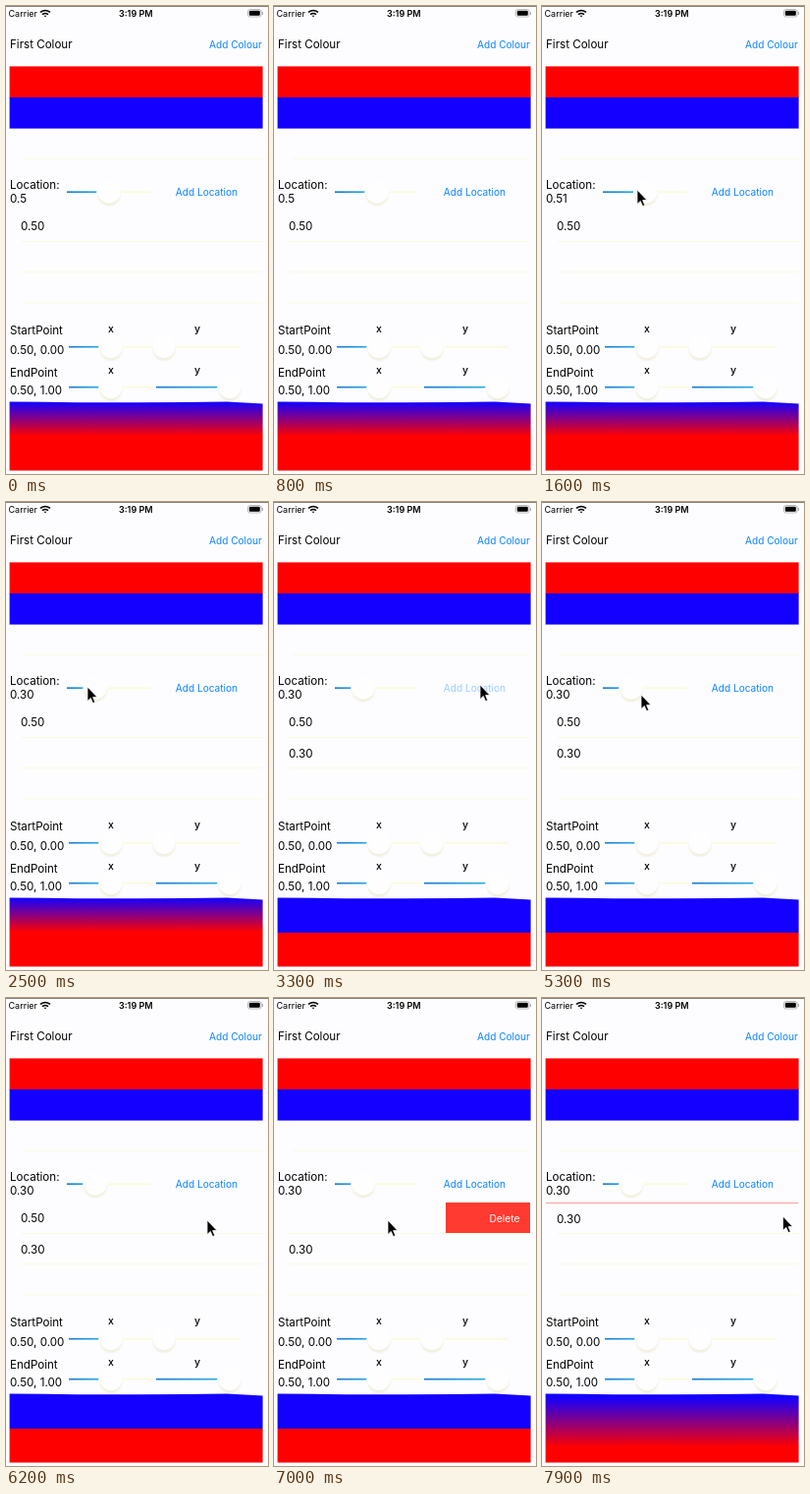
Recreate the animation shown at these times as an HTML page. Size 267 by 476 pixels, loop 8 s.

```html
<!DOCTYPE html>
<html lang="en">
<head>
<meta charset="utf-8">
<title>Gradient editor</title>
<style>
  html, body { margin: 0; width: 100%; height: 100%; overflow: hidden; background: #fdfdff; }
  svg { display: block; width: 100vw; height: 100vh; }
  text { font: 11.6px Inter, "Liberation Sans", sans-serif; fill: #000; }
  .status { font-size: 9px; }
  .bold { font-weight: 600; }
  .axis { font-size: 10.5px; font-weight: 500; text-anchor: middle; }
  .link { font-size: 10.1px; fill: #0a84ff; }
  .delete { font-size: 10.3px; fill: #fff; text-anchor: middle; }
  .rule { stroke: #fafae2; }
</style>
</head>
<body>
<svg viewBox="0 0 267 476" preserveAspectRatio="none">
  <defs>
    <linearGradient id="preview" x1="0" y1="403" x2="0" y2="472" gradientUnits="userSpaceOnUse">
      <stop id="stopBlue" stop-color="#1400ff"/>
      <stop id="stopRed" stop-color="#f00"/>
    </linearGradient>
    <linearGradient id="fill">
      <stop stop-color="#1478dc"/>
      <stop offset="1" stop-color="#2cb8e8"/>
    </linearGradient>
    <radialGradient id="shadow">
      <stop offset=".75" stop-color="#f0eeda"/>
      <stop offset="1" stop-color="#fdfdff"/>
    </radialGradient>
    <clipPath id="table"><rect x="4" y="208" width="257" height="95"/></clipPath>
  </defs>
  <rect width="267" height="476" fill="#fdfdff"/>
  <rect width="267" height="1" fill="#8c8282"/>

  <text class="status" x="2.5" y="11">Carrier</text>
  <g fill="none" stroke="#000" stroke-width="1.5">
    <path d="M35 6.4Q40 2.4 45 6.4M37 8.7Q40 6.3 43 8.7"/>
    <path d="M38.5 9.7h3L40 11.3z" fill="#000" stroke="none"/>
  </g>
  <text class="status bold" x="115" y="11">3:19 PM</text>
  <rect x="246.5" y="3.5" width="13.5" height="7.5" rx="2" fill="none" stroke="#aaa" stroke-width=".8"/>
  <rect x="247.8" y="4.8" width="11" height="5" rx="1"/>
  <path d="M261.3 6v3" stroke="#999"/>

  <text x="4" y="43">First Colour</text>
  <text class="link" x="207" y="42.5">Add Colour</text>
  <rect x="3.6" y="61.4" width="258" height="32" fill="#f00"/>
  <rect x="3.6" y="93" width="258" height="31.6" fill="#1400ff"/>
  <path class="rule" d="M19 155.5H261"/>

  <text x="4" y="186">Location:</text>
  <text id="value" x="4" y="200"></text>
  <text id="addLocation" class="link" x="172.8" y="192.5">Add Location</text>

  <g clip-path="url(#table)">
    <path class="rule" d="M15 239.5H261M15 270.5H261M15 302H261"/>
    <text id="firstRow" y="228">0.50</text>
    <rect id="deleteBox" y="208" fill="#ff3a30"/>
    <text id="deleteLabel" class="delete" x="235" y="228">Delete</text>
    <text id="secondRow" x="15">0.30</text>
  </g>

  <text x="4" y="334">StartPoint</text>
  <text x="4" y="353.5">0.50, 0.00</text>
  <text x="4" y="376.5">EndPoint</text>
  <text x="4" y="394.5">0.50, 1.00</text>
  <text class="axis" x="107" y="332">x</text>
  <text class="axis" x="195" y="332">y</text>
  <text class="axis" x="107" y="373.5">x</text>
  <text class="axis" x="195" y="373.5">y</text>
  <g id="sliders"></g>

  <path d="M3.6 402.4Q140 404 225 402.6L261.6 404.5V472.4H3.6z" fill="url(#preview)"/>
  <path id="cursor" d="M0 0V14.5L3.3 11.4 5.6 16.6 7.8 15.7 5.6 10.6H10z" fill="#000" stroke="#fff" stroke-width=".8"/>
</svg>
<script>
const LOOP = 8000, STEP = 100;
const $ = id => document.getElementById(id);
const set = (el, attrs) => { for (const k in attrs) el.setAttribute(k, attrs[k]); };
const progress = (t, from, to) => Math.min(1, Math.max(0, (t - from) / (to - from)));
const ease = p => p * p * (3 - 2 * p);
const mix = (a, b, p) => a + (b - a) * p;

function add(parent, name, attrs) {
  const el = document.createElementNS('http://www.w3.org/2000/svg', name);
  set(el, attrs);
  return parent.appendChild(el);
}

function makeSlider(left, right, y) {
  const group = $('sliders');
  add(group, 'rect', { x: left, y: y - .7, width: right - left, height: 1.4, fill: '#fbf9d4' });
  const bar = add(group, 'rect', { x: left, y: y - .8, height: 1.6, fill: 'url(#fill)' });
  const shadow = add(group, 'circle', { cy: y + 2.5, r: 13, fill: 'url(#shadow)' });
  const thumb = add(group, 'circle', { cy: y, r: 11.5, fill: '#fefefe' });
  return x => {
    set(bar, { width: x - left });
    set(shadow, { cx: x });
    set(thumb, { cx: x });
  };
}

const locationSlider = makeSlider(62, 147, 189.2);
makeSlider(64, 150, 346.7)(107);
makeSlider(152, 238, 346.7)(161);
makeSlider(64, 150, 387.7)(107);
makeSlider(153, 238, 387.7)(228);

// time, x, y of the pointer tip
const pointer = [
  [800, 150, 476], [1400, 98, 188], [1600, 97, 187], [1700, 97, 187], [2500, 83, 188],
  [2600, 83, 188], [3100, 210, 186], [3400, 210, 186], [4200, 118, 215], [5300, 101, 196],
  [6200, 205, 226], [6300, 205, 226], [6800, 116, 226], [7000, 116, 226],
  [7400, 242, 222], [7900, 245.5, 222]
];

function pointerAt(t) {
  let i = 0;
  while (i < pointer.length - 2 && t > pointer[i + 1][0]) i++;
  const [t0, x0, y0] = pointer[i], [t1, x1, y1] = pointer[i + 1];
  const p = ease(progress(t, t0, t1));
  return [mix(x0, x1, p), mix(y0, y1, p)];
}

function render(t) {
  const value = t < 1500 ? .5 : mix(.51, .3, ease(progress(t, 1700, 2500)));
  $('value').textContent = t < 1500 ? '0.5' : value.toFixed(2);
  locationSlider(70 + 70 * value);

  const pressed = t >= 3100 && t < 3400;
  set($('addLocation'), { opacity: pressed ? .4 : 1 });

  const swipe = 86 * ease(progress(t, 6300, 6800));
  const collapse = ease(progress(t, 7500, 7900));
  set($('firstRow'), { x: 15 - swipe, opacity: 1 - collapse });
  set($('deleteBox'), {
    x: mix(261 - swipe, 4, collapse),
    width: mix(swipe, 257, collapse),
    height: mix(31, 1, collapse),
    opacity: mix(1, .5, collapse)
  });
  set($('deleteLabel'), { opacity: swipe > 50 && collapse < .4 ? 1 : 0 });
  set($('secondRow'), { y: mix(259.5, 228.5, collapse), opacity: t < 3200 ? 0 : 1 });

  const split = ease(progress(t, 3200, 3300));
  const merge = ease(progress(t, 7500, 7800));
  set($('stopBlue'), { offset: mix(.5 * split, .05, merge) });
  set($('stopRed'), { offset: mix(.5, .78, merge) });

  const [x, y] = pointerAt(t);
  set($('cursor'), { transform: `translate(${x} ${y})`, opacity: t < 800 ? 0 : 1 });
}

const start = performance.now();
function tick() {
  const t = (performance.now() - start) % LOOP;
  render(Math.floor(t / STEP) * STEP);
  requestAnimationFrame(tick);
}
tick();
</script>
</body>
</html>
```
